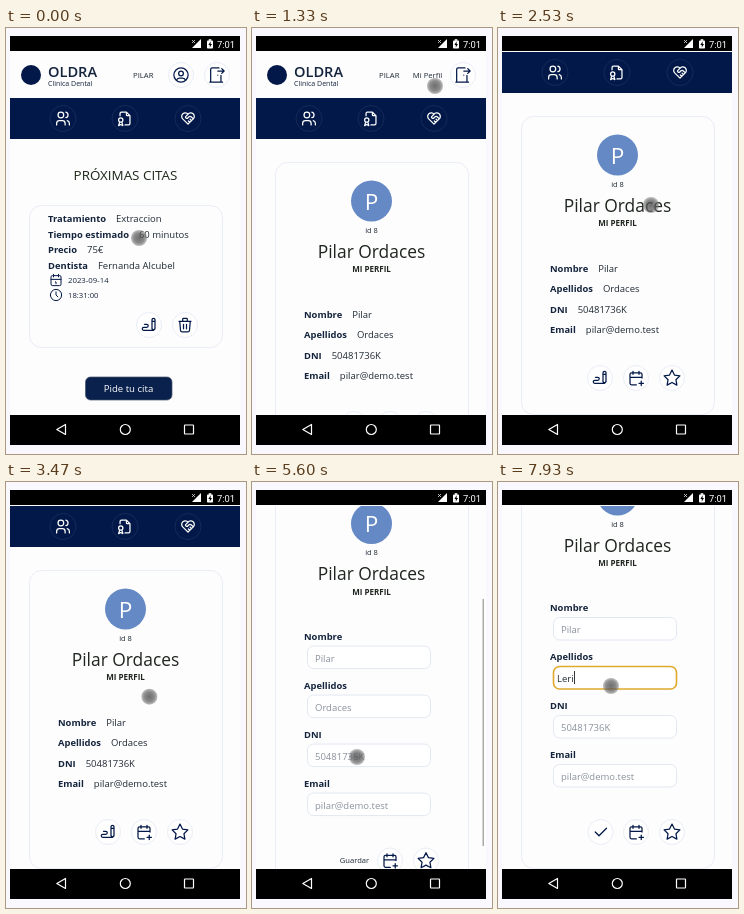
An HTML page with a canvas that plays this animation: 240x426 px, repeating every 8 s.

```html
<!DOCTYPE html>
<html lang="es">
<head>
<meta charset="utf-8">
<title>Clinica Dental</title>
<style>
html, body { margin: 0; width: 100%; height: 100%; overflow: hidden; background: #f8f8fe; }
canvas { display: block; width: 100vw; height: 100vh; }
</style>
</head>
<body>
<canvas id="stage"></canvas>
<script>
const W = 240, H = 426, LOOP = 8000;
const NAVY = '#021848', INK = '#14243c', BODY = '#1f2933', PAPER = '#fdfdfe', FAINT = '#e9edf5';
const SANS = '"Open Sans", "Noto Sans", sans-serif';
const canvas = document.getElementById('stage');
const ctx = canvas.getContext('2d');

const icons = {
  users: 'M5 7a4 4 0 1 0 8 0a4 4 0 1 0-8 0M3 21v-2a4 4 0 0 1 4-4h4a4 4 0 0 1 4 4v2M16 3.1a4 4 0 0 1 0 7.8M21 21v-2a4 4 0 0 0-3-3.9',
  file: 'M14 3v4a1 1 0 0 0 1 1h4M5 8V5a2 2 0 0 1 2-2h7l5 5v11a2 2 0 0 1-2 2h-5M3 14a3 3 0 1 0 6 0a3 3 0 1 0-6 0M4.5 17L3 22l3-1.5L9 22l-1.5-5',
  heart: 'M19.5 12.6L12 20l-7.5-7.4A5 5 0 1 1 12 6a5 5 0 1 1 7.5 6.6M12 6L8.7 9.3a1 1 0 0 0 0 1.4l.5.5c.7.7 1.8.7 2.5 0l1-1a3.2 3.2 0 0 1 4.5 0l2.3 2.3M12.5 15.5l2 2M15 13l2 2',
  person: 'M3 12a9 9 0 1 0 18 0a9 9 0 1 0-18 0M9 10a3 3 0 1 0 6 0a3 3 0 1 0-6 0M6.2 18.8A4 4 0 0 1 10 16h4a4 4 0 0 1 3.8 2.9',
  exit: 'M13 12v.1M3 21h16M4 21V5a2 2 0 0 1 2-2h8.5M17 12.5V21M13 7h8m-3-3l3 3l-3 3',
  edit: 'M20 17V5c0-1.1-.9-2-2-2s-2 .9-2 2v12l2 2l2-2zM16 7h4M18 19H5a2 2 0 1 1 0-4h4a2 2 0 1 0 0-4H6',
  trash: 'M4 7h16M10 11v6M14 11v6M5 7l1 12a2 2 0 0 0 2 2h8a2 2 0 0 0 2-2l1-12M9 7V4a1 1 0 0 1 1-1h4a1 1 0 0 1 1 1v3',
  date: 'M4 7a2 2 0 0 1 2-2h12a2 2 0 0 1 2 2v12a2 2 0 0 1-2 2H6a2 2 0 0 1-2-2zM16 3v4M8 3v4M4 11h16M11 15h1v3',
  clock: 'M3 12a9 9 0 1 0 18 0a9 9 0 1 0-18 0M12 7v5l3 3',
  plan: 'M12.5 21H6a2 2 0 0 1-2-2V7a2 2 0 0 1 2-2h12a2 2 0 0 1 2 2v5M16 3v4M8 3v4M4 11h16M16 19h6M19 16v6',
  star: 'M12 17.75l-6.17 3.25l1.18-6.88l-5-4.87l6.9-1L12 2l3.09 6.25l6.9 1l-5 4.87l1.18 6.88z',
  check: 'M5 12l5 5L20 7'
};
for (const name in icons) icons[name] = new Path2D(icons[name]);

const patient = [
  ['Nombre', 'Pilar'],
  ['Apellidos', 'Ordaces'],
  ['DNI', '50481736K'],
  ['Email', 'pilar@demo.test']
];
const typed = 'Leri', keyTimes = [7150, 7400, 7620, 7820];
const TAP_PROFILE = 950, OPEN_PROFILE = 1050, TAP_EDIT = 4650, TAP_FIELD = 6600;

// Each key: time, then values; motion eases between keys.
const pointerKeys = [
  [0, 133, 210], [200, 133, 210], [850, 183, 58], [1430, 183, 58], [1850, 153, 177],
  [3250, 153, 177], [4000, 107, 357], [4800, 107, 357], [5150, 105, 275],
  [6050, 105, 275], [6500, 113, 204], [LOOP, 113, 204]
];
const scrollKeys = [[0, 0], [1850, 0], [2150, 46], [5150, 46], [5820, 160], [LOOP, 160]];

function track(keys, t) {
  let i = 1;
  while (i < keys.length - 1 && t >= keys[i][0]) i++;
  const a = keys[i - 1], b = keys[i];
  const k = Math.min(1, (t - a[0]) / (b[0] - a[0]));
  const e = k * k * (3 - 2 * k);
  return a.slice(1).map((v, n) => v + (b[n + 1] - v) * e);
}

function text(s, x, y, size, color = INK, align = 'left', weight = 400, family = SANS) {
  ctx.font = `${weight} ${size}px ${family}`;
  ctx.textAlign = align;
  ctx.fillStyle = color;
  ctx.fillText(s, x, y);
  return ctx.measureText(s).width;
}

function rect(x, y, w, h, color) {
  ctx.fillStyle = color;
  ctx.fillRect(x, y, w, h);
}

function round(x, y, w, h, r, fill, line, width = 1) {
  ctx.beginPath();
  ctx.roundRect(x, y, w, h, r);
  if (fill) { ctx.fillStyle = fill; ctx.fill(); }
  if (line) { ctx.strokeStyle = line; ctx.lineWidth = width; ctx.stroke(); }
}

function disc(x, y, r, fill, line, width = 1) {
  round(x - r, y - r, 2 * r, 2 * r, r, fill, line, width);
}

function icon(name, x, y, size, color = NAVY, weight = 1.25) {
  const k = size / 24;
  ctx.save();
  ctx.translate(x - size / 2, y - size / 2);
  ctx.scale(k, k);
  ctx.lineWidth = weight / k;
  ctx.lineCap = ctx.lineJoin = 'round';
  ctx.strokeStyle = color;
  ctx.stroke(icons[name]);
  ctx.restore();
}

function iconButton(name, x, y, size = 18) {
  disc(x, y, 12.5, '#fff', FAINT);
  icon(name, x, y, size);
}

function pair(label, value, x, y) {
  const w = text(label, x, y, 9.4, INK, 'left', 700);
  text(value, x + w + 10, y, 9.5, BODY);
}

function header(t) {
  disc(25, 47, 10, NAVY);
  text('OLDRA', 42, 49, 14.6, INK, 'left', 600);
  text('Clinica Dental', 42, 58, 7, INK);
  text('PILAR', 127, 50, 7.7, BODY);
  if (t < TAP_PROFILE) iconButton('person', 175, 47, 19);
  else text('Mi Perfil', 175.5, 50, 7.7, BODY, 'center');
  iconButton('exit', 211, 47, 19);
  rect(4, 70, 230, 41, NAVY);
  [['users', 57], ['file', 119], ['heart', 182]].forEach(([name, x]) => {
    disc(x, 90.5, 13, null, '#142a57');
    icon(name, x, 90.5, 17, '#fff');
  });
}

function appointments() {
  text('PRÓXIMAS CITAS', 119.5, 152, 13.4, '#1d2818', 'center');
  round(23.5, 177.5, 193, 142, 12, PAPER, FAINT);
  pair('Tratamiento', 'Extraccion', 42, 194);
  pair('Tiempo estimado', '60 minutos', 42, 210);
  pair('Precio', '75€', 42, 225);
  pair('Dentista', 'Fernanda Alcubel', 42, 241);
  icon('date', 50, 252, 15, NAVY, 1);
  text('2023-09-14', 62, 255, 7.8);
  icon('clock', 50, 267, 15, NAVY, 1);
  text('18:31:00', 62, 270, 7.7);
  iconButton('edit', 143, 297);
  iconButton('trash', 179, 297);
  round(79.5, 349, 86.5, 23, 5, '#0a214d', '#46536b', 0.7);
  text('Pide tu cita', 122.5, 364, 9.6, '#fff', 'center');
}

function field(label, value, i, t) {
  const y = 295 + i * 49;
  const focused = i === 1 && t >= TAP_FIELD;
  const count = focused ? keyTimes.filter(k => t >= k).length : 0;
  text(label, 52, y - 6, 9.4, INK, 'left', 700);
  round(55.5, y + 0.5, 123, 22.5, 6, '#fff', focused ? '#dfa92c' : '#dfe5f0', focused ? 1.6 : 0.9);
  let caret = 59.5;
  if (count) caret += text(typed.slice(0, count), 59, y + 16, 9.5, BODY);
  else text(value, 63, y + 16, 9.5, '#8a929d');
  if (focused && (count || (t - TAP_FIELD) % 1000 < 500)) rect(caret, y + 5, 0.9, 13, '#222');
}

function profile(t) {
  const editing = t >= TAP_EDIT;
  const bottom = editing ? 546 : 432, rowY = editing ? 510 : 396;
  round(23.5, 134.5, 193, bottom - 134, 12, PAPER, FAINT);
  disc(119.5, 173, 20.5, '#6489c5');
  text('P', 119.5, 181.5, 22.5, '#fff', 'center');
  text('id 8', 119.5, 204.5, 7.5, BODY, 'center');
  text('Pilar Ordaces', 119.5, 229.5, 17.4, '#20261f', 'center');
  text('MI PERFIL', 119.5, 244, 8, '#20261f', 'center', 700);
  patient.forEach(([label, value], i) => {
    if (editing) field(label, value, i, t);
    else pair(label, value, 52, 290 + i * 20.4);
  });
  if (!editing) iconButton('edit', 102, rowY);
  else if (t < TAP_FIELD) text('Guardar', 102.5, rowY + 2.5, 7.6, BODY, 'center');
  else iconButton('check', 102.5, rowY);
  iconButton('plan', 138, rowY);
  iconButton('star', 174, rowY, 19);
}

function scrollBar(t, scroll) {
  const shown = (t > 1850 && t < 2450) || (t > 5150 && t < 6400);
  if (!shown) return;
  const view = 363, inset = 3.5;
  const k = (view - 2 * inset) / (view + (t < TAP_EDIT ? 46 : 160));
  rect(230.5, 24 + inset + scroll * k, 1.5, view * k, '#a9aca4');
}

function phoneBars() {
  rect(4, 8, 230, 15, '#000');
  rect(4, 387, 230, 30, '#000');
  ctx.fillStyle = '#fff';
  ctx.fill(new Path2D('M195 11V20H186z'));
  ctx.strokeStyle = '#ddd';
  ctx.lineWidth = 0.8;
  ctx.stroke(new Path2D('M186 12l3 3m0-3l-3 3'));
  round(201, 12.5, 6, 8, 0.8, '#fff');
  rect(202.7, 11.2, 2.6, 1.6, '#fff');
  ctx.fillStyle = '#000';
  ctx.fill(new Path2D('M204.6 13.3l-2.2 3.6h1.4v2.6l2.2-3.6h-1.4z'));
  text('7:01', 229, 19.5, 9.4, '#fff', 'right', 400, 'Roboto, sans-serif');
  ctx.strokeStyle = '#fff';
  ctx.lineWidth = 1.2;
  ctx.lineJoin = 'round';
  ctx.stroke(new Path2D('M59.5 396.5V406.5L50.8 401.5z'));
  disc(119.3, 401.5, 5, null, '#fff', 1.2);
  round(178.5, 397, 9, 9, 0.5, null, '#fff', 1.2);
}

function pointer(t) {
  const [x, y] = track(pointerKeys, t);
  const g = ctx.createRadialGradient(x, y, 0, x, y, 8.5);
  g.addColorStop(0, 'rgba(70,70,70,.78)');
  g.addColorStop(0.6, 'rgba(95,95,95,.72)');
  g.addColorStop(1, 'rgba(140,140,140,.5)');
  disc(x, y, 8, g);
}

function draw(t) {
  const [scroll] = track(scrollKeys, t);
  rect(0, 0, W, H, '#f8f8fe');
  rect(4, 23, 230, 364, PAPER);
  ctx.save();
  ctx.beginPath();
  ctx.rect(4, 24, 230, 363);
  ctx.clip();
  ctx.translate(0, -scroll);
  header(t);
  if (t < OPEN_PROFILE) appointments();
  else profile(t);
  ctx.restore();
  scrollBar(t, scroll);
  phoneBars();
  pointer(t);
}

function resize() {
  const dpr = window.devicePixelRatio || 1;
  canvas.width = Math.round(innerWidth * dpr);
  canvas.height = Math.round(innerHeight * dpr);
}

const start = performance.now();
function tick() {
  ctx.setTransform(canvas.width / W, 0, 0, canvas.height / H, 0, 0);
  draw((performance.now() - start) % LOOP);
  requestAnimationFrame(tick);
}

addEventListener('resize', resize);
resize();
tick();
</script>
</body>
</html>
```
